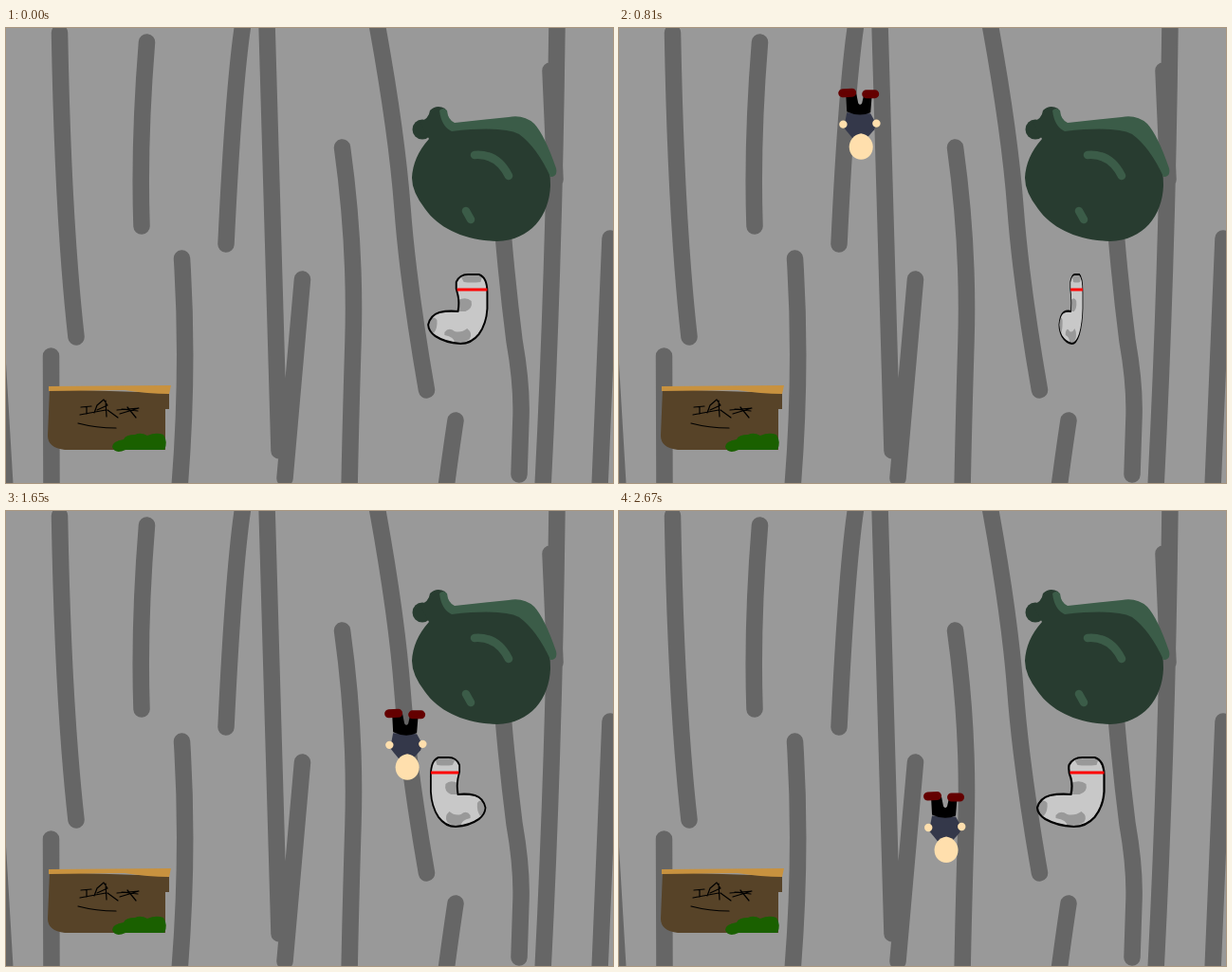
An HTML page for the animation above (2700 ms loop, 640x480 px).

```html
<!DOCTYPE html>
<html lang="en">
<head>
<meta charset="utf-8">
<title>Walk past the bag</title>
<style>
  html, body { margin: 0; width: 100%; height: 100%; overflow: hidden; background: #999; }
  svg { display: block; width: 640px; height: 480px; }
  .line { fill: none; stroke-linecap: round; stroke-linejoin: round; }
</style>
</head>
<body>
<svg viewBox="0 0 640 480">
  <path class="line" stroke="#666" stroke-width="17.5" d="M56.500 5Q60 200 74 326M148.500 15Q140 120 143 209M250 -5Q240 60 232 228
    M275 -5Q283 260 288 446M312.500 265Q306 340 294 475M354.500 126Q369 230 366 330T362 490M391 -5Q412 110 418 190T443.500 382
    M185.500 243Q193 360 183 485M47.500 346L48 485M474 414Q470 440 464 485M524 215Q529 275 536 330Q544 375 543 410L541 471
    M581 -5Q578 250 566 485M574 45L579 160M637 222Q632 350 626 485M-9 350Q-5 420 -1 485"/>

  <g id="crate">
    <path fill="#574328" d="M46 381L172 385V402H168V445H62Q44 443 44 430Z"/>
    <path fill="#c8923f" d="M45 378L174 377L172 386Q150 386 125 382L45 383Z"/>
    <path fill="#1a6000" d="M112 442Q112 436 124 434Q126 429 136 429Q142 426 149 430Q158 426 166 429Q171 437 167 445H126Q115 450 112 442Z"/>
    <path class="line" stroke="#000" stroke-width="1.200" d="M79 400L90 399M85 400V407M78 408L105 403M93 406L96 398L103 392L107 398L96 403
      M105 393L106 410M107 403L118 411M117 403L140 401L120 407M122 402L139 404M128 400L137 411M76 417Q95 422 116 422"/>
  </g>

  <g id="bag">
    <g fill="#283c30">
      <circle cx="439" cy="107" r="10.500"/>
      <path d="M436 99Q446 96 447 87Q454 80 463 85L470 106L530 98Q548 100 560 118Q574 138 574 166C573 198 553 224 518 225
        C484 224 457 212 442 191Q428 173 428 158Q429 136 446 117Z"/>
    </g>
    <path fill="#3b5c48" d="M457 87Q461 83 465 87Q466 97 473 100L530 94Q546 91 557 101Q568 113 580 148Q582 157 574 157
      Q560 126 541 112Q523 103 470 109Q459 104 457 87Z"/>
    <path class="line" stroke="#3b5c48" stroke-width="8.500" d="M494 134Q518 132 530 156M485 193L490 202"/>
  </g>

  <!-- drawn around its own spin axis -->
  <g id="sock">
    <path id="shape" fill="#c8c8c8" d="M-2 268Q2 260 12 260H25Q35 263 35 279V296Q34 312 25 323Q16 333 3 333Q-15 332 -27 325
      Q-35 320 -35.500 313Q-33 303 -22 300Q-12 298 0 299Q2 290 0 282Q-3 275 -2 268Z"/>
    <path fill="#999" d="M4 263Q16 259 29 262L27 268Q16 269 7 268ZM0 287Q10 283 16 288Q18 296 9 299H0Z
      M-35 310Q-29 302 -25 308Q-24 317 -29 322L-34 319ZM-16 321Q-11 315 -4 320Q4 322 11 317Q18 322 14 328Q5 334 -4 332Q-4 326 -16 324Z"/>
    <use href="#shape" class="line" style="fill-opacity:0" stroke="#000" stroke-width="2.200"/>
    <path stroke="#f00" stroke-width="3" d="M-1 276H35"/>
  </g>

  <!-- drawn around the centre of the head -->
  <g id="walker">
    <path fill="#34384a" d="M-15 -36L10 -35L16 -24L14 -18L6 -9H-9L-18 -20Z"/>
    <path d="M-16 -56H-5L-3 -46Q-1 -43 1 -46L3 -55H11.500L10 -36Q-2 -31 -15 -37Z"/>
    <path class="line" stroke="#640000" stroke-width="9" d="M-19.500 -56.500L-9.500 -57M5.500 -55.500H14.500"/>
    <g fill="#ffdfad">
      <circle cx="-18.800" cy="-23.500" r="4.200"/>
      <circle cx="16.200" cy="-24.500" r="4.200"/>
      <path d="M0 -14C8 -13 12.500 -6 12.500 0C12.500 8 7 13.500 0 13.500S-12.500 8 -12.500 0C-12.500 -6 -8 -13 0 -14Z"/>
    </g>
  </g>
</svg>
<script>
const LOOP = 2700, SPIN = 450, SPIN_START = 120;
const route = [[0, 157.5, -29], [540, 198, 85], [1080, 312, 165], [1920, 475.5, 320], [LOOP, 340, 359]];
const sock = document.getElementById('sock');
const walker = document.getElementById('walker');

function walkerAt(t) {
  const i = route.findIndex(point => point[0] > t);
  const [t0, x0, y0] = route[i - 1], [t1, x1, y1] = route[i];
  const k = (t - t0) / (t1 - t0);
  return [x0 + (x1 - x0) * k, y0 + (y1 - y0) * k];
}

const easeInOut = u => u < 0.5 ? (2 * u) ** 1.67 / 2 : 1 - (2 - 2 * u) ** 1.67 / 2;

// One full turn about the vertical axis, starting edge-on.
function sockWidthAt(t) {
  const u = (t - SPIN_START + SPIN) % SPIN / SPIN;
  const width = -Math.sin(2 * Math.PI * easeInOut(u));
  return Math.abs(width) < 0.03 ? 0.03 : width;
}

function draw(now) {
  const t = now % LOOP;
  walker.setAttribute('transform', `translate(${walkerAt(t)})`);
  sock.setAttribute('transform', `translate(476.5) scale(${sockWidthAt(t)} 1)`);
  requestAnimationFrame(draw);
}
draw(0);
</script>
</body>
</html>
```
